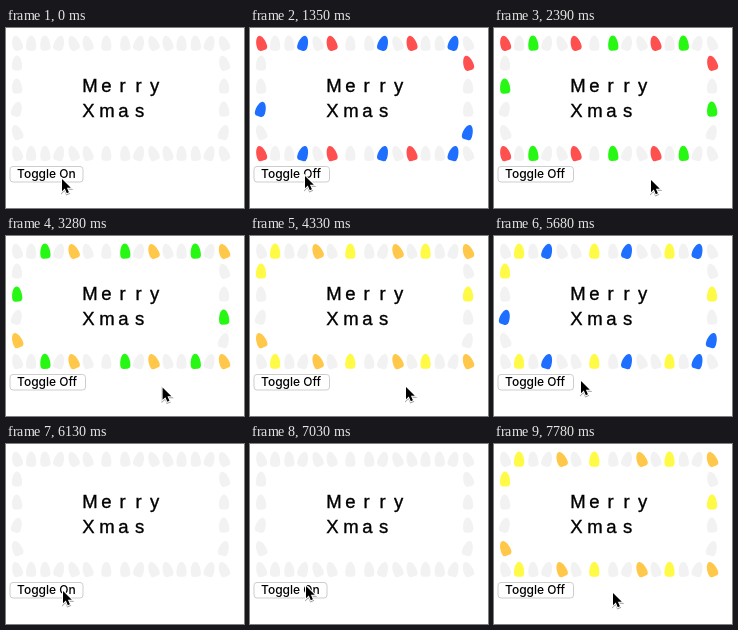
An HTML page that plays this animation: 238x180 px, repeating every 8 s.

```html
<!DOCTYPE html>
<html lang="en">
<head>
<meta charset="utf-8">
<title>Xmas lights</title>
<style>
html, body { margin: 0; width: 100%; height: 100%; overflow: hidden; background: #fff; }
svg { display: block; width: 100%; height: 100%; }
.title { font: 18.5px "Liberation Sans", Arial, sans-serif; text-anchor: middle; stroke: #000; stroke-width: .35; }
.label { font: 500 12px Inter, Roboto, sans-serif; }
#cursor { filter: drop-shadow(0 1px .7px #0006); }
</style>
</head>
<body>
<svg viewBox="0 0 238 180">
  <defs>
    <path id="bulb" d="M-5.1 3.5C-5.1-2.5-2.8-7.6 0-7.6S5.1-2.5 5.1 3.5Q5.1 7.5 1.8 7.5H-1.8Q-5.1 7.5-5.1 3.5Z"/>
  </defs>
  <g id="lights"></g>
  <text class="title" x="84 100.5 116.5 132.5 148.5" y="64">Merry</text>
  <text class="title" x="82.5 101 117.5 133.5" y="89">Xmas</text>
  <rect id="button" x="4" y="138.5" height="15.5" rx="3" fill="#fff" stroke="#c8c8c8" stroke-width=".9"/>
  <text id="label" class="label" x="11" y="150"></text>
  <g id="cursor">
    <path d="M1 2V14.2L3.8 11.6L5.8 16.2L7.9 15.3L5.9 10.8H9.8Z" stroke="#fff" stroke-width="2" paint-order="stroke"/>
  </g>
</svg>
<script>
const LOOP = 8000;
const TICK = 150;      // the screen refreshes at this pace
const BLINK = 500;     // time between two light patterns
const OFF = '#f2f2f2';
const KINDS = [
  { color: '#ff5050', tilt: -17 },
  { color: '#fffa46', tilt: 0 },
  { color: '#26f814', tilt: -4 },
  { color: '#1e6eff', tilt: 17 },
  { color: '#ffc84b', tilt: -22 }
];
const SESSIONS = [{ on: 1280, off: 6100 }, { on: 7280, off: LOOP }];

// Pointer key points: time, x, y
const PATH = [
  [0, 55, 149], [150, 54, 146], [1950, 54, 146], [2400, 156, 150], [4350, 155, 149],
  [5700, 86, 143], [6150, 56, 145], [6750, 125, 148], [7050, 55, 140],
  [7500, 55, 140], [7800, 118, 147]
];

const $ = id => document.getElementById(id);
const clamp = (v, lo, hi) => Math.min(hi, Math.max(lo, v));
const ease = p => p * p * (3 - 2 * p);
const bulbs = KINDS.map(() => []);

function addBulb(x, y, kind) {
  const use = document.createElementNS('http://www.w3.org/2000/svg', 'use');
  use.setAttribute('href', '#bulb');
  use.setAttribute('transform', `translate(${x} ${y}) rotate(${KINDS[kind].tilt})`);
  $('lights').append(use);
  bulbs[kind].push(use);
}

// Rows are spaced a little wider around the middle
for (let i = 0; i < 15; i++) {
  const x = 11 + 14.1 * i + 4.7 * clamp(i - 5, 0, 2);
  addBulb(x, 15.2, i % 5);
  addBulb(x, 125.3, i % 5);
}
for (let i = 0; i < 4; i++) {
  const y = 35 + i * 23.1;
  addBulb(11, y, i + 1);
  addBulb(218, y, i);
}

function pointerAt(t) {
  const i = PATH.findIndex(p => p[0] > t);
  if (i < 0) return PATH[PATH.length - 1].slice(1);
  const [t0, x0, y0] = PATH[i - 1];
  const [t1, x1, y1] = PATH[i];
  const p = ease((t - t0) / (t1 - t0));
  return [x0 + (x1 - x0) * p, y0 + (y1 - y0) * p];
}

function render(time) {
  const t = Math.floor((time + 20) / TICK) * TICK;
  const session = SESSIONS.find(s => t >= s.on && t < s.off);
  const step = session && Math.floor((t - session.on) / BLINK);
  const lit = session ? [step % 5, (step + 3) % 5] : [];
  KINDS.forEach(({ color }, kind) => {
    const fill = lit.includes(kind) ? color : OFF;
    bulbs[kind].forEach(b => b.setAttribute('fill', fill));
  });
  $('label').textContent = session ? 'Toggle Off' : 'Toggle On';
  $('button').setAttribute('width', session ? 75.5 : 73);
  $('cursor').setAttribute('transform', `translate(${pointerAt(t)})`);
}

const start = performance.now();
function tick() {
  render((performance.now() - start) % LOOP);
  requestAnimationFrame(tick);
}
tick();
</script>
</body>
</html>
```
